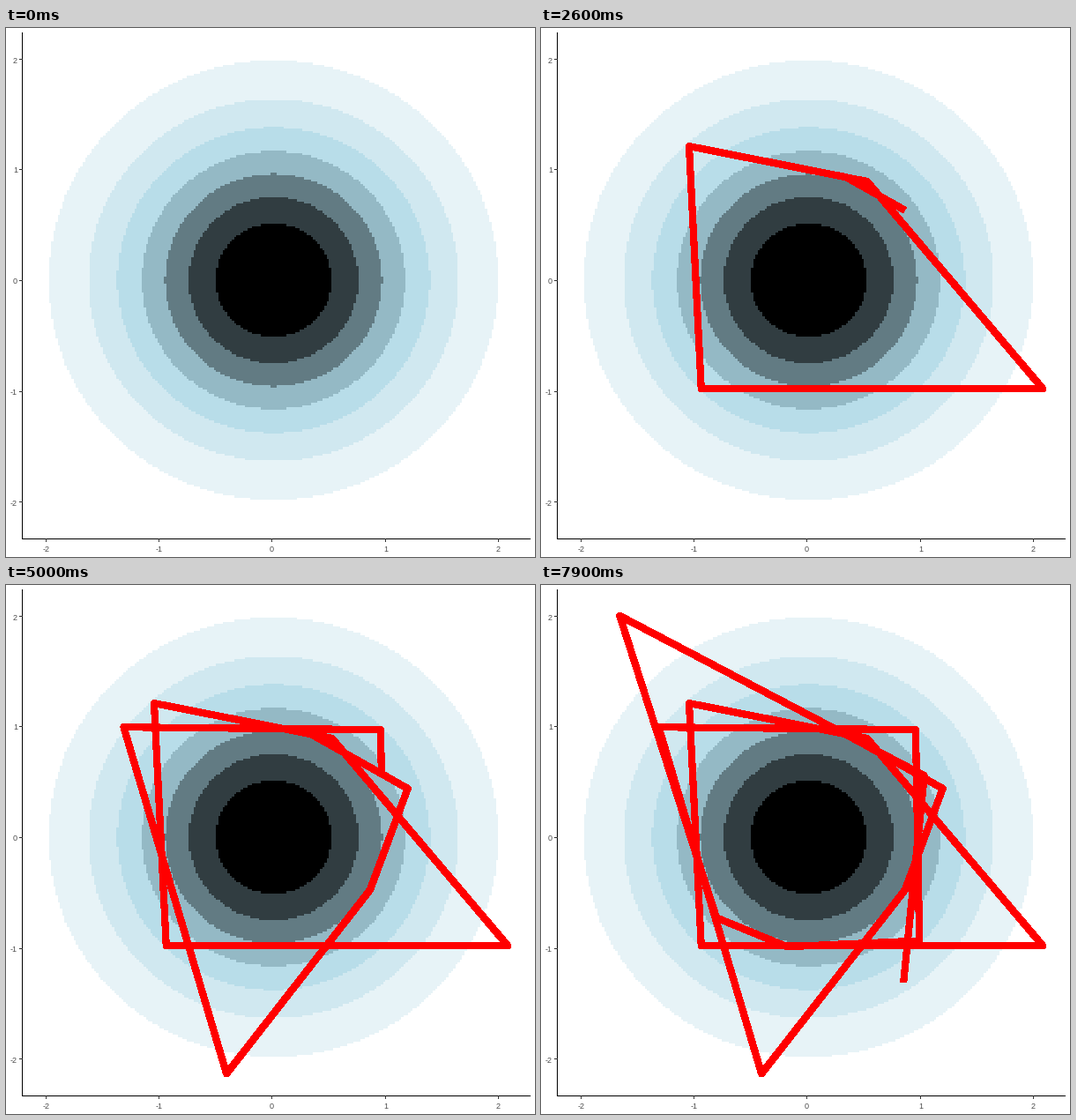
These frames come from a looping animation (600 by 600 pixels, 8 s). A matplotlib script:

```python
import numpy as np
import matplotlib.pyplot as plt
from matplotlib.animation import FuncAnimation
from matplotlib.colors import LinearSegmentedColormap

SIZE, DPI = 600, 100
FRAMES, INTERVAL = 80, 100
PX = 72 / DPI  # points per pixel
RADIUS = 0.98  # every leg of the path is tangent to this circle

fig = plt.figure(figsize=(SIZE / DPI, SIZE / DPI), dpi=DPI, facecolor="white")
ax = fig.add_axes([0, 0, 1, 1])
ax.axis("off")


def to_px(x, y):
    return 301.4 + 128.25 * x, 286 - 125.6 * y


def draw_density():
    """Gaussian density on a grid, cut into eight bands."""
    grid = np.linspace(-2, 2, 201)
    gx, gy = np.meshgrid(grid, grid)
    z = np.exp(-(gx**2 + gy**2) / 2)
    bands = np.clip(7 - np.floor((1 - z) / 0.1232), 0, 7)
    cmap = LinearSegmentedColormap.from_list(
        "density", ["white", "lightblue", "black"], N=8)
    w, h = 100.5 * 2.56, 100.5 * 2.505
    ax.imshow(bands, cmap=cmap, vmin=0, vmax=7, interpolation="nearest",
              aspect="auto", extent=(303 - w, 303 + w, 286 + h, 286 - h))


def rule(xs, ys, color="black"):
    ax.plot(xs, ys, color=color, lw=PX, antialiased=False, solid_capstyle="butt")


def label(x, y, text, ha):
    ax.text(x, y, text, ha=ha, va="center_baseline", color="#4d4d4d",
            family="Liberation Sans", fontsize=9 * PX)


def draw_axes():
    rule([18, 18], [5, 579])
    rule([18, 594], [579, 579])
    for v in range(-2, 3):
        x, y = np.round(to_px(v, v))
        rule([x, x], [579, 582], "#333333")
        rule([15, 18], [y, y], "#333333")
        label(x + 0.5, 590.5, str(v), "center")
        label(13, y + 1, str(v), "right")


def bouncing_path():
    """Corners of a particle whose bounces keep its angular momentum.

    A leg is given by the angle of its tangent point; two neighbouring
    tangents meet in a corner.
    """
    angle = np.radians([78.5, 39.7, -90, -177.2, -281.4, -299.9, -380, -397.4,
                        -523.8, -630.6, -719, -807.4, -832.8, -882.6, -1018.2,
                        -1085.6])
    mid = (angle[1:] + angle[:-1]) / 2
    r = RADIUS / np.cos(np.diff(angle) / 2)
    last = angle[-1]
    end_x = RADIUS * np.cos(last) + 1.5 * np.sin(last)
    end_y = RADIUS * np.sin(last) - 1.5 * np.cos(last)
    return (np.concatenate([[0], r * np.cos(mid), [end_x]]),
            np.concatenate([[1], r * np.sin(mid), [end_y]]))


draw_density()
draw_axes()
ax.set(xlim=(0, SIZE), ylim=(SIZE, 0))

px, py = bouncing_path()
arc = np.append(0, np.cumsum(np.hypot(np.diff(px), np.diff(py))))
path, = ax.plot([], [], color="red", lw=7.2 * PX, antialiased=False,
                solid_capstyle="butt", solid_joinstyle="round")


def travelled(step):
    return 0.3929 * step - 6.3e-7 * step**3  # nearly constant speed


def update(step):
    if step == 0:
        path.set_data([], [])
        return path,
    s = travelled(step)
    done = arc < s
    path.set_data(*to_px(np.append(px[done], np.interp(s, arc, px)),
                         np.append(py[done], np.interp(s, arc, py))))
    return path,


anim = FuncAnimation(fig, update, frames=FRAMES, interval=INTERVAL,
                     repeat=True, repeat_delay=0, blit=False)
plt.show()
```
